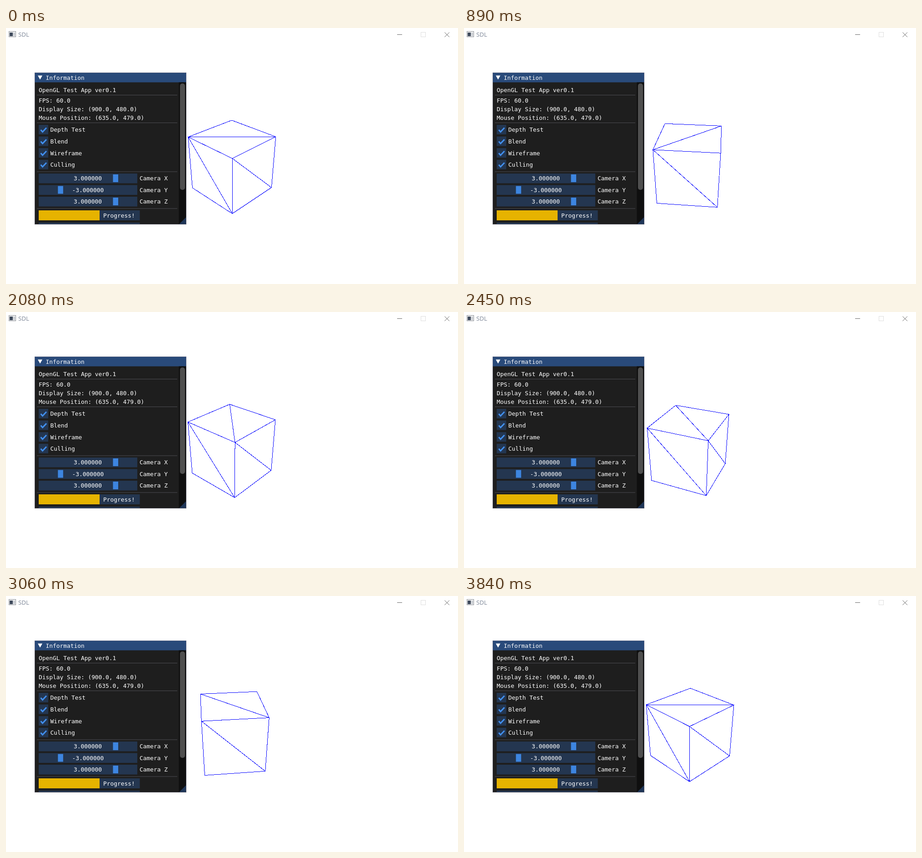
Animation of 995x563 px, one loop 3.86 s. Source, as an HTML page:

```html
<!DOCTYPE html>
<html lang="en">
<head>
<meta charset="utf-8">
<title>SDL</title>
<style>
  html, body { margin: 0; width: 100%; height: 100%; overflow: hidden; background: #fff; }
  svg { display: block; width: 995px; height: 563px; }
  #panel text { font: 12.86px "DejaVu Sans Mono", "Liberation Mono", monospace; fill: #fff; }
  #bar text { font: 13.3px "Open Sans", Inter, sans-serif; fill: #7b8596; }
  #cube { fill: none; stroke: #00f; stroke-width: 1; shape-rendering: crispEdges; }
</style>
</head>
<body>
<svg viewBox="0 0 995 563">
  <g id="bar">
    <rect x="6.5" y="7.5" width="15" height="12" fill="#f4f4f4" stroke="#8c9097"/>
    <rect x="8" y="10" width="7" height="8" fill="#3f4a5c"/>
    <rect x="16" y="10" width="4" height="8" fill="#c9cdd3"/>
    <text x="27" y="18.7">SDL</text>
    <g fill="none" stroke="#666">
      <path d="M861 14.5H872"/>
      <rect x="913.5" y="9.5" width="10" height="10" stroke="#dedede"/>
      <path d="M965.5 9.5l10.5 10.5M976 9.5l-10.5 10.5"/>
    </g>
  </g>
  <g id="panel"></g>
  <path id="cube"/>
</svg>
<script>
const FRAME = '#243650', GRAB = '#3d85e0', CHECK = '#4290f0';

const rect = (x, y, w, h, fill, rx = 0) =>
  `<rect x="${x}" y="${y}" width="${w}" height="${h}" rx="${rx}" fill="${fill}"/>`;
const label = (x, y, s) => `<text x="${x}" y="${y}">${s}</text>`;
const separator = y => rect(68, y, 309, 1, '#4d4d53');

const checkbox = (name, y) => rect(72, y, 21, 21, FRAME) +
  `<path d="M76.5 ${y + 11}l4 4.5 8.5-9" fill="none" stroke="${CHECK}" stroke-width="3"/>` +
  label(97.5, y + 15.3, name);

const slider = (axis, y, value, textX, grabX) => rect(72, y, 217, 21.5, FRAME) +
  rect(grabX, y + 2, 11.5, 17, GRAB) + label(textX, y + 15.3, value) +
  label(294, y + 15.3, 'Camera ' + axis);

document.getElementById('panel').innerHTML = [
  rect(63, 98, 334, 334, '#1e1e1e'),
  rect(63, 98, 334, 21.5, '#294a7a'),
  '<path d="M70 104.5h10l-5 9z" fill="#fff"/>',
  label(87.5, 113.8, 'Information'),
  rect(380.5, 119.5, 16, 312, '#0f0f0f'),
  rect(383, 122, 11, 234, '#4f4f4f', 5),
  label(72, 140.5, 'OpenGL Test App ver0.1'),
  label(72, 164, 'FPS: 60.0'),
  label(72, 183, 'Display Size: (900.0, 480.0)'),
  label(72, 202, 'Mouse Position: (635.0, 479.0)'),
  [147, 208, 315.5, 396.5].map(separator).join(''),
  ['Depth Test', 'Blend', 'Wireframe', 'Culling']
    .map((name, i) => checkbox(name, 213 + 25.6 * i)).join(''),
  slider('X', 320, '3.000000', 149, 235.5),
  slider('Y', 345.5, '-3.000000', 145.5, 114.3),
  slider('Z', 371, '3.000000', 149, 235.5),
  rect(72, 401, 222.5, 22, FRAME),
  rect(72, 401, 134, 22, '#e6b300'),
  label(214, 416.5, 'Progress!'),
  rect(72, 428, 222.5, 3.5, FRAME),
  '<path d="M396.5 416v15.5h-15.5z" fill="#1f3658"/>',
  '<rect x="63.5" y="98.5" width="333" height="333" fill="none" stroke="#6e6e80" stroke-opacity=".6"/>'
].join('');

const LOOP = 3860, STEP = 21.6, PHASE = 15.2;
// Turn of the cube in degrees at each step; the early part runs slower.
const TURN = [[0, 0.4], [25, 22.8], [41, 39], [49, 46.9], [71, 65.8], [179, 180.5]];

function turnAt(ms) {
  const n = Math.floor((ms + PHASE) / STEP);
  const i = Math.max(1, TURN.findIndex(k => k[0] >= n));
  const [[n0, a0], [n1, a1]] = [TURN[i - 1], TURN[i]];
  return a0 + (a1 - a0) * (n - n0) / (n1 - n0);
}

// Unit cube seen from 3, -3, 2.5 relative to its centre.
const HALF = 0.5, REACH = Math.hypot(3, 3), DIST = Math.hypot(3, 3, 2.5);
const COS = REACH / DIST, SIN = 2.5 / DIST;
const FOCAL = 637, CX = 497.5, CY = 298.2;
const rad = deg => deg * Math.PI / 180;

function project(deg, z) {
  const r = HALF * Math.SQRT2;
  const u = r * Math.sin(rad(deg)), w = r * Math.cos(rad(deg));
  const k = FOCAL / (DIST - w * COS - z * SIN);
  return [CX + u * k, CY - (z * COS - w * SIN) * k].map(v => v.toFixed(2)).join(' ');
}

function cubePath(turn) {
  const corners = [0, 90, 180, 270].map(a => a + turn);
  const top = corners.map(a => project(a, HALF));
  const low = corners.map(a => project(a, -HALF));
  let d = `M${top.join('L')}ZM${top[1]}L${top[3]}`;
  corners.forEach((a, i) => {
    if (Math.cos(rad(a + 45)) * REACH <= HALF) return; // faces away
    const j = (i + 1) % 4;
    d += `M${top[i]}L${low[i]}L${low[j]}L${top[j]}M${top[i]}L${low[j]}`;
  });
  return d;
}

const cube = document.getElementById('cube');
const start = performance.now();
function draw() {
  cube.setAttribute('d', cubePath(turnAt((performance.now() - start) % LOOP)));
  requestAnimationFrame(draw);
}
draw();
</script>
</body>
</html>
```
